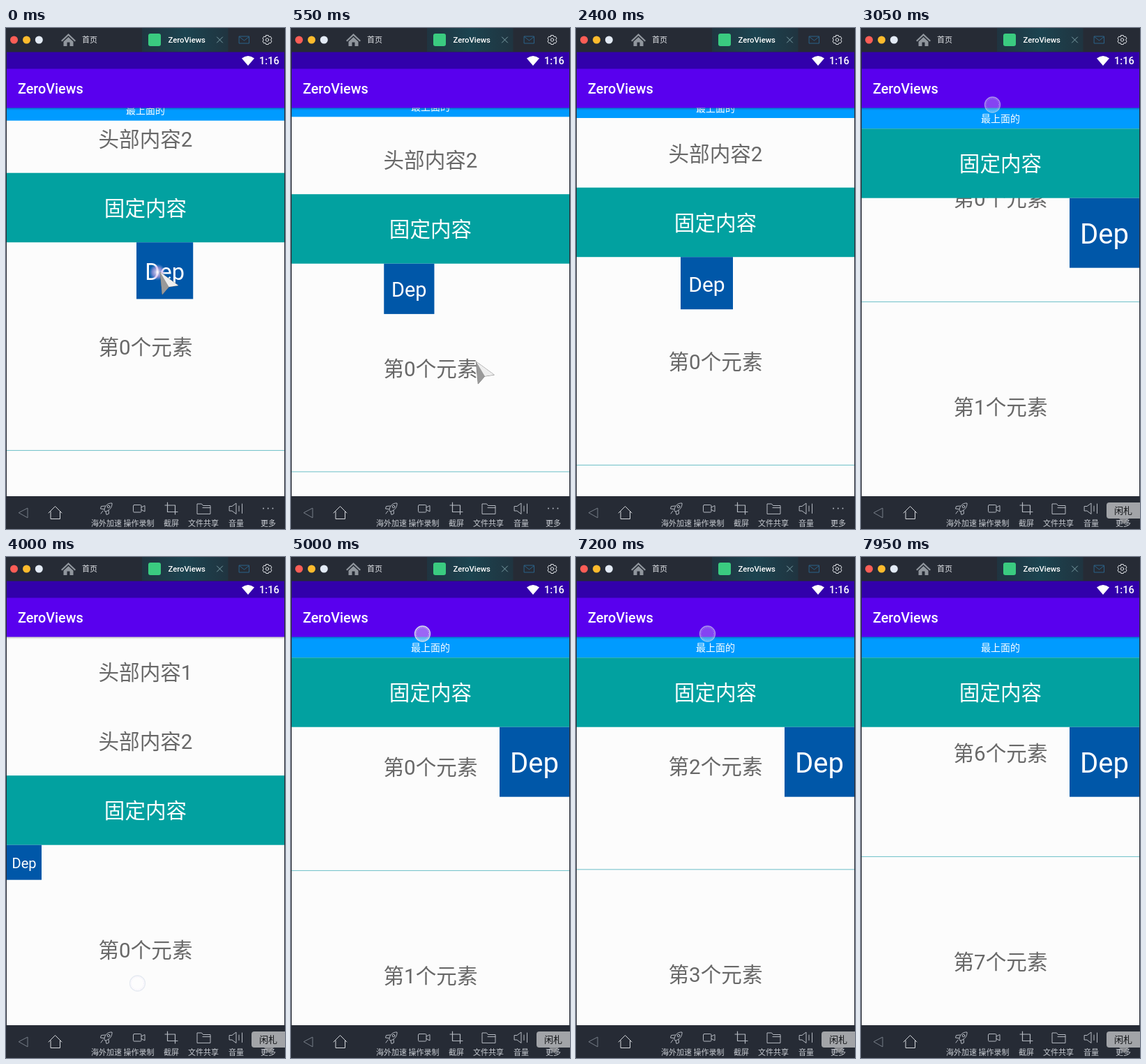
An HTML page that plays this animation: 400x718 px, repeating every 8000 ms.

```html
<!DOCTYPE html>
<html lang="zh-CN">
<head>
<meta charset="utf-8">
<title>ZeroViews</title>
<style>
html, body { margin: 0; width: 100%; height: 100%; overflow: hidden; background: #262b35; }
svg { display: block; width: 100%; height: 100%; }
text { font-family: Roboto, "Noto Sans CJK SC", "Noto Sans CJK", sans-serif; }
.mid { text-anchor: middle; }
.big { font-size: 29.6px; fill: #686868; text-anchor: middle; }
.white { fill: #fff; }
.line { fill: none; stroke: #b4b9c1; stroke-width: 1; stroke-linejoin: round; stroke-linecap: round; }
.dock text { font-size: 11px; fill: #c6cad0; text-anchor: middle; }
</style>
</head>
<body>
<svg viewBox="0 0 400 718" preserveAspectRatio="none">
  <defs>
    <linearGradient id="shade" x2="0" y2="1">
      <stop stop-color="#000" stop-opacity=".25"/><stop offset="1" stop-color="#000" stop-opacity="0"/>
    </linearGradient>
    <linearGradient id="tab" x2="1" y2="0">
      <stop stop-color="#203440"/><stop offset=".5" stop-color="#1c4450"/><stop offset="1" stop-color="#203440"/>
    </linearGradient>
    <radialGradient id="glow">
      <stop stop-color="#fff" stop-opacity=".9"/><stop offset=".6" stop-color="#c9a4e8" stop-opacity=".6"/>
      <stop offset="1" stop-color="#8fb8f0" stop-opacity="0"/>
    </radialGradient>
  </defs>

  <rect width="400" height="718" fill="#262b35"/>
  <rect x="1" y="114" width="398" height="557" fill="#fcfcfc"/>
  <g id="list"></g>
  <rect id="head" x="1" y="114" width="398" fill="#fcfcfc"/>
  <text id="head1" class="big" x="200">头部内容1</text>
  <text id="head2" class="big" x="200">头部内容2</text>
  <g id="pinned">
    <rect x="1" width="398" height="99.5" fill="#02a1a0"/>
    <text class="big white" x="200" y="61.3" style="fill:#fff">固定内容</text>
  </g>
  <g id="bar">
    <rect x="1" width="398" height="30" fill="#009bff"/>
    <text class="mid white" x="200" y="20.7" font-size="14">最上面的</text>
  </g>
  <g id="dep">
    <rect width="50" height="50" fill="#0057a8"/>
    <text class="mid white" x="25" y="32.9" font-size="20">Dep</text>
  </g>

  <rect x="1" y="114" width="398" height="4" fill="url(#shade)"/>
  <rect width="400" height="35" fill="#262b35"/>
  <rect x="1" y="34.5" width="398" height="24.5" fill="#3200ab"/>
  <rect x="1" y="58.5" width="398" height="56" fill="#5900ee"/>
  <text class="white" x="17" y="94" font-size="19.8" font-weight="500">ZeroViews</text>
  <path d="M338 43.5Q347 36.500 356 43.500L347 54Z" class="white"/>
  <text class="white" x="363" y="52.300" font-size="14.600" font-weight="500">1:16</text>

  <circle cx="11.500" cy="17" r="5.500" fill="#fc5d56"/>
  <circle cx="29.500" cy="17" r="5.500" fill="#fdbb2d"/>
  <circle cx="47.300" cy="17" r="5.500" fill="#e2eaf5"/>
  <path d="M79 18L89.500 8L100 18L98.500 19.500L89.500 11L80.500 19.500ZM82.500 19.500L89.500 13L96.500 19.500V26H91.500V20.500H87.500V26H82.500Z" fill="#90969d"/>
  <text x="109" y="21" font-size="11" fill="#dfe2e6">首页</text>
  <rect x="195" width="123.500" height="34" fill="url(#tab)"/>
  <rect x="204" y="8" width="18" height="18" rx="3" fill="#3acb80"/>
  <text class="white" x="232.500" y="21" font-size="11.300" font-weight="500">ZeroViews</text>
  <path class="line" d="M302.500 13L310.500 21M310.500 13L302.500 21" style="stroke:#7da0a7"/>
  <path class="line" d="M334.500 12H348.500V22H334.500ZM334.500 12.500L341.500 18L348.500 12.500" style="stroke:#2a6288"/>
  <path class="line" d="M372.800 10.500H376.200L377 12.600L379.300 12.200L381 15L379.500 17L381 19L379.300 21.800L377 21.400L376.200 23.500H372.800L372 21.400L369.700 21.800L368 19L369.500 17L368 15L369.700 12.200L372 12.600Z" style="stroke:#e0e3e7"/>
  <circle class="line" cx="374.500" cy="17" r="2.200" style="stroke:#e0e3e7"/>

  <rect y="671" width="400" height="47" fill="#262b35"/>
  <g class="dock">
    <path class="line" d="M18.500 694.500L31 688V701.500Z" style="stroke:#777e88"/>
    <path class="line" d="M61 695L70.500 685.500L80 695M64 693V703.500H77.500V693" style="stroke:#d5d8dc"/>
    <path class="line" d="M141 691C141 685 146 680.500 152 681C152.500 687 148 692 142.500 693ZM142 685L136.500 685.500L135.500 689L140.500 689.500M147 691L147.500 696L144 697.500L143 693M139 692L136 696"/>
    <circle class="line" cx="147" cy="686" r="1.800"/>
    <rect class="line" x="182.500" y="683.500" width="11.500" height="10.500" rx="1.500"/>
    <path class="line" d="M194 687L199 684.500V693L194 690.500"/>
    <path class="line" d="M231.500 680V693.500H246M228 684H242.500V697" style="stroke-width:1.200"/>
    <path class="line" d="M274 696V682H280.500L282.500 684.500H293V696ZM282 687.500H293"/>
    <path class="line" d="M320.500 685.500H324L330 681V696.500L324 692H320.500ZM334 685V692.500M338.500 682V695.500"/>
    <path class="line" d="M369 688.500h.1M375.700 688.500h.1M382.400 688.500h.1" style="stroke-width:1.800"/>
    <g id="labels"></g>
  </g>

  <g id="tip">
    <path d="M370 703H384L377 711Z" fill="#a5a7aa" opacity=".75"/>
    <rect x="352" y="680" width="52" height="23" rx="4" fill="#a2a4a8"/>
    <text class="mid" x="376" y="696" font-size="13" fill="#15171a">闲札</text>
  </g>

  <g id="touch">
    <circle r="11" fill="#fff" fill-opacity=".4" stroke="#d4dcea" stroke-width="1.300"/>
    <circle r="9" fill="none" stroke="#e4d4fa" stroke-width="1" stroke-dasharray="1 1.500"/>
  </g>
  <g id="mouse">
    <circle id="press" cx="-4" cy="0" r="12" fill="url(#glow)"/>
    <path d="M0 0L26 19L12.500 21L3 32Z" fill="#c2c2c2" stroke="#666" stroke-width=".8"/>
    <path d="M0 0L26 19L12.500 21Z" fill="#eee"/>
    <path d="M0 0L12.500 21L3 32Z" fill="#999"/>
  </g>
</svg>
<script>
const LOOP = 8000, STEP = 50;
const RANGE = 169, OPEN_Y = 313.2, PINNED_H = 99.5, ITEM_H = 298.5;
const $ = id => document.getElementById(id);
const clamp = v => Math.max(0, Math.min(1, v));
const move = (el, x, y, k = 1) => el.setAttribute('transform', `translate(${x} ${y}) scale(${k})`);

// Total scroll: time, distance, ease-out power of the segment that ends there.
const SCROLL = [
  [0, 105.5, 1], [400, 75, 1], [850, 75, 1], [1300, 620.5, 2], [1750, 620.5, 1],
  [2400, 84.5, 1], [2600, 0, 1.5], [2700, 0, 1], [3200, 350, 2], [3450, 350, 1],
  [3850, 0, 1.5], [4450, 0, 1], [5000, 261.5, 1], [5650, 480, 2], [5850, 480, 1],
  [6300, 0, 1.5], [6850, 0, 1], [7950, 2072.5, 1.4]
];
// Swipes: start, end, start y, end y, fade-out time.
const HIGH = 110, LOW = 611;
const SWIPES = [
  [900, 1150, LOW, HIGH, 150], [1800, 2200, HIGH, LOW, 150], [2700, 3000, LOW, HIGH, 150],
  [3450, 3850, HIGH, LOW, 350], [4450, 5000, LOW, HIGH, 200], [5850, 6150, HIGH, LOW, 150],
  [6850, 7150, LOW, HIGH, 150]
];

function scrollAt(t) {
  const i = SCROLL.findIndex(k => k[0] > t);
  if (i < 0) return SCROLL[SCROLL.length - 1][1];
  const [t0, d0] = SCROLL[i - 1], [t1, d1, power] = SCROLL[i];
  return d0 + (d1 - d0) * (1 - (1 - (t - t0) / (t1 - t0)) ** power);
}

const labels = { 海外加速: 144, 操作录制: 190.5, 截屏: 237, 文件共享: 283, 音量: 330, 更多: 376 };
$('labels').innerHTML = Object.entries(labels)
  .map(([name, x]) => `<text x="${x}" y="713.5">${name}</text>`).join('');

$('list').innerHTML = ('<g><text class="big" x="200" y="161"></text>' +
  `<rect x="1" y="${ITEM_H - 0.8}" width="398" height="1.1" fill="#79c5cc"/></g>`).repeat(3);
const rows = [...$('list').children];

function drawList(top, offset) {
  const first = Math.floor(offset / ITEM_H);
  rows.forEach((row, i) => {
    row.firstChild.textContent = `第${first + i}个元素`;
    move(row, 0, top + (first + i) * ITEM_H - offset);
  });
}

function drawTouch(t) {
  const swipe = SWIPES.find(([a, b, , , fade]) => t >= a && t < b + fade);
  $('touch').style.opacity = 0;
  if (!swipe) return;
  const [a, b, from, to, fade] = swipe;
  move($('touch'), 188.5, from + (to - from) * clamp((t - a) / (b - a)));
  $('touch').style.opacity = 1 - clamp((t - b) / fade);
}

function drawMouse(t, scroll) {
  const leave = clamp((t - 450) / 350);
  const y = 350 + SCROLL[0][1] - scroll;
  move($('mouse'), 221 + 155 * leave, y + (722 - y) * leave);
  $('mouse').style.opacity = t < 800 ? 1 : 0;
  $('press').style.opacity = t < 420 ? 1 : 0;
}

function render(t) {
  const scroll = scrollAt(t);
  const p = clamp(scroll / RANGE);
  const y = OPEN_Y - RANGE * p;
  $('head').setAttribute('height', y - 114);
  $('head1').setAttribute('y', y - 137.5);
  $('head2').setAttribute('y', y - 38);
  move($('pinned'), 0, y);
  move($('bar'), 0, 84 + 30 * p);
  move($('dep'), 1 + 298 * p, y + PINNED_H, 1 + p);
  drawList(y + PINNED_H, Math.max(0, scroll - RANGE));
  drawTouch(t);
  drawMouse(t, scroll);
  $('tip').style.opacity = t >= 3000 ? 1 : 0;
}

const start = performance.now();
function tick() {
  const t = (performance.now() - start) % LOOP;
  render(Math.floor(t / STEP) * STEP);
  requestAnimationFrame(tick);
}
tick();
</script>
</body>
</html>
```
